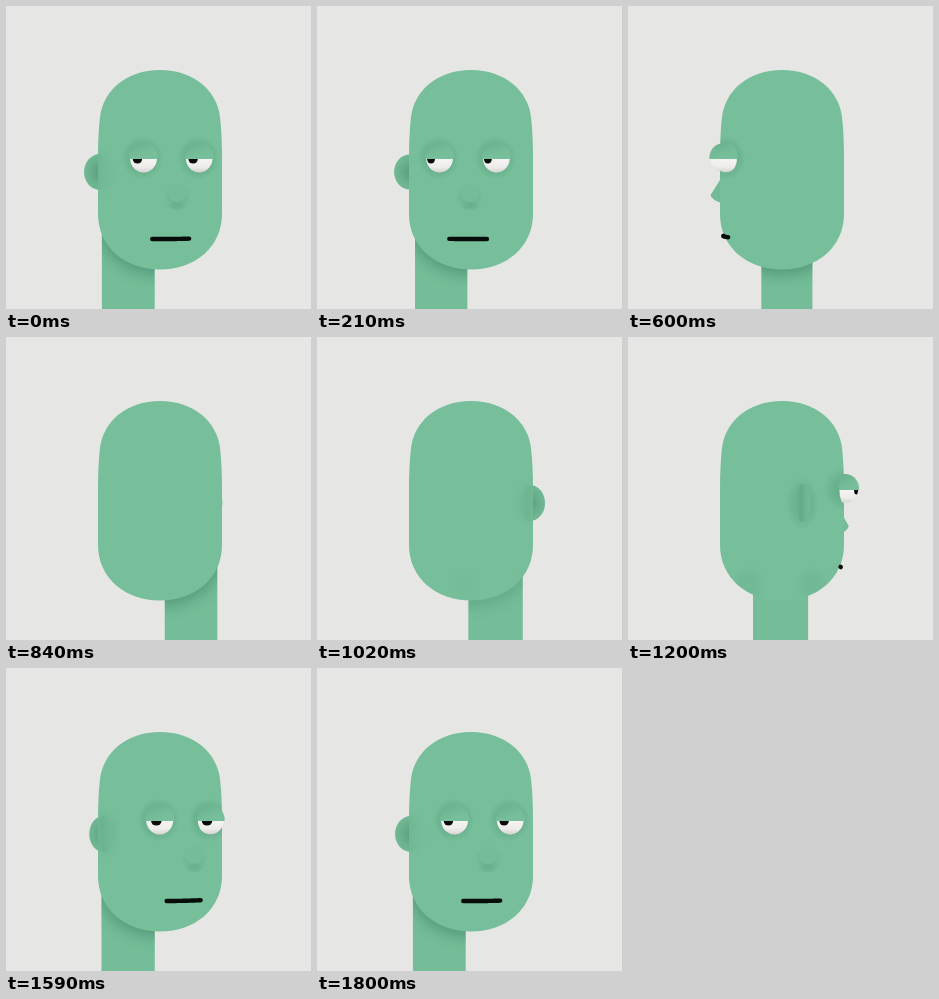
Recreate the animation shown at these times as an HTML page. Size 305 by 303 pixels, loop 1830 ms.

```html
<!DOCTYPE html>
<html lang="en">
<head>
<meta charset="utf-8">
<title>Turning head</title>
<style>
  html, body { margin: 0; width: 100%; height: 100%; overflow: hidden; background: #e6e6e4; }
  svg { display: block; width: 100vw; height: 100vh; }
</style>
</head>
<body>
<svg viewBox="0 0 305 303" preserveAspectRatio="none">
  <defs>
    <path id="skull" d="M92 152C92 138 92.500 124 94 111C97 85 120 64 154 64S211 85 214 111C215.500 124 216 138 216 152V208C216 241 189 263.500 154 263.500S92 241 92 208Z"/>
    <clipPath id="inHead"><use href="#skull"/></clipPath>
    <clipPath id="inNeck"><rect id="neckClip" y="190" height="113"/></clipPath>
    <clipPath id="inWhite0"><path id="whiteClip0"/></clipPath>
    <clipPath id="inWhite1"><path id="whiteClip1"/></clipPath>
    <radialGradient id="shade">
      <stop offset=".45" stop-color="#2f6f54" stop-opacity=".55"/>
      <stop offset="1" stop-color="#2f6f54" stop-opacity="0"/>
    </radialGradient>
    <radialGradient id="earBowl">
      <stop offset=".1" stop-color="#5f9f80"/>
      <stop offset=".7" stop-color="#6cb28f"/>
      <stop offset="1" stop-color="#70b893"/>
    </radialGradient>
    <linearGradient id="earFill">
      <stop offset="0" stop-color="#70b793"/>
      <stop offset=".4" stop-color="#66aa88"/>
      <stop offset="1" stop-color="#76bf9a"/>
    </linearGradient>
    <linearGradient id="lidFill" x2=".6" y2="1">
      <stop offset="0" stop-color="#69b08d"/>
      <stop offset=".8" stop-color="#76bf9a"/>
    </linearGradient>
    <linearGradient id="whiteFill" x2="0" y2="1">
      <stop offset="0" stop-color="#f6f4f3"/>
      <stop offset=".6" stop-color="#eeecea"/>
      <stop offset="1" stop-color="#d3d3cf"/>
    </linearGradient>
    <filter id="soft" x="-30%" y="-30%" width="160%" height="160%"><feGaussianBlur stdDeviation="8"/></filter>
  </defs>
  <rect width="305" height="303" fill="#e6e6e4"/>
  <rect id="neck" y="190" height="113" fill="#74bd98"/>
  <g clip-path="url(#inNeck)">
    <use id="chinShadow" href="#skull" y="4" fill="#2f6f54" filter="url(#soft)"/>
  </g>
  <ellipse id="earBack" fill="url(#earBowl)"/>
  <path id="nose" fill="#72bb96"/>
  <use href="#skull" fill="#76bf9a"/>
  <g clip-path="url(#inHead)" fill="url(#shade)">
    <ellipse id="neckShadeL" cy="247" rx="18" ry="20"/>
    <ellipse id="neckShadeR" cy="247" rx="18" ry="20"/>
    <ellipse id="earShade"/>
    <ellipse id="eyeShade0"/>
    <ellipse id="eyeShade1"/>
    <g id="noseFront">
      <ellipse id="noseShade" cy="191" ry="14" opacity=".2"/>
      <ellipse id="noseTip" cy="188" ry="8" fill="#76bf9a" opacity=".75"/>
      <ellipse id="noseBase" cy="200" ry="5" opacity=".2"/>
    </g>
    <ellipse id="earFront" fill="url(#earFill)"/>
  </g>
  <polyline id="mouth" fill="none" stroke="#080c0a" stroke-width="4.400" stroke-linecap="round" stroke-linejoin="round"/>
  <g id="eyes">
    <g id="eye0">
      <path id="white0" fill="url(#whiteFill)"/>
      <ellipse id="pupil0" fill="#080c0a" clip-path="url(#inWhite0)"/>
      <path id="lid0" fill="url(#lidFill)"/>
    </g>
    <g id="eye1">
      <path id="white1" fill="url(#whiteFill)"/>
      <ellipse id="pupil1" fill="#080c0a" clip-path="url(#inWhite1)"/>
      <path id="lid1" fill="url(#lidFill)"/>
    </g>
  </g>
</svg>
<script>
const LOOP = 1830, STEP = 30, TURN = 1800;
const CX = 154, EYE_Y = 152, HEAD_R = 62;
const rad = deg => deg * Math.PI / 180;
const sin = deg => Math.sin(rad(deg)), cos = deg => Math.cos(rad(deg));
const perspective = z => 740 / (800 - z);
const $ = id => document.getElementById(id);

function set(id, attrs) {
  for (const key in attrs) $(id).setAttribute(key, attrs[key]);
}

// A point at an angle around the vertical axis, with x relative to the centre.
function orbit(angle, radius) {
  const z = radius * cos(angle), scale = perspective(z);
  return { x: radius * sin(angle) * scale, z, scale };
}

// Outline of the part of a slightly tall ball that stands out of the round head.
function ballPath(ball, r, from, to) {
  const left = [], right = [];
  for (let i = 0; i <= 20; i++) {
    const lat = from + (to - from) * i / 20;
    const ring = r * cos(lat), y = EYE_Y + 1.08 * r * sin(lat);
    let min = Infinity, max = -Infinity;
    for (let a = 0; a <= 180; a += 2) {
      const x = ball.x + ring * cos(a), z = ball.z + ring * sin(a);
      const outside = x * x + z * z > HEAD_R * HEAD_R;
      if (outside && (z > 0 || Math.abs(x) > HEAD_R)) {
        min = Math.min(min, x);
        max = Math.max(max, x);
      }
    }
    if (min <= max) {
      left.push(`${(CX + min).toFixed(2)} ${y.toFixed(2)}`);
      right.unshift(`${(CX + max).toFixed(2)} ${y.toFixed(2)}`);
    }
  }
  return left.length ? `M${left.concat(right).join("L")}Z` : "";
}

function drawNeck(turn) {
  const p = turn - 16.5, depth = 32 * sin(p);
  const scale = 830 / (830 - depth);
  const x = CX - 32 * cos(p) * scale, w = 53 * scale;
  set("neck", { x: x - w / 2, width: w });
  set("neckClip", { x: x - w / 2, width: w });
  const near = Math.max(0, sin(p));
  set("chinShadow", { opacity: 0.52 * (1 - near ** 2) });
  set("neckShadeL", { cx: x - w / 2 - 4, opacity: 0.12 * near ** 3 });
  set("neckShadeR", { cx: x + w / 2 + 4, opacity: 0.12 * near ** 3 });
}

function drawEar(turn) {
  const a = turn - 86, ear = orbit(a, 66);
  const facing = Math.max(0, cos(a));
  const width = length => Math.hypot(length * sin(a), 7.5 * cos(a)) * ear.scale;
  const place = { cx: CX + ear.x, cy: 166, ry: 19 * ear.scale };
  set("earBack", { ...place, rx: width(17) });
  set("earFront", { ...place, rx: width(9), opacity: facing });
  set("earShade", { ...place, rx: width(9) + 9, ry: 27, opacity: 0.3 * facing });
}

function drawNose(turn) {
  const a = turn + 2, tip = orbit(a, 77), root = orbit(a, 62);
  const x = CX + tip.x, b = CX + root.x;
  set("nose", { d: `M${b} 166Q${(x + b) / 2} 178 ${x} 189Q${x} 194 ${b} 198Z` });
  const face = Math.max(0, cos(a));
  set("noseFront", { opacity: Math.min(1, face * 1.4) });
  set("noseShade", { cx: x, rx: 5 + 9 * face });
  set("noseTip", { cx: x, rx: 3 + 6 * face });
  set("noseBase", { cx: x, rx: 3 + 7 * face });
}

function drawMouth(turn) {
  const points = [];
  for (let a = turn - 18; a <= turn + 18; a += 1) {
    const z = 61 * cos(a), scale = perspective(z) ** 0.5;
    if (z > -3) points.push(`${CX + 61 * sin(a) * scale},${152 + 81 * scale}`);
  }
  set("mouth", { points: points.join(" ") });
}

function drawEyes(turn) {
  const gaze = turn - 40;
  const balls = [-24.5, 24.5].map(side => orbit(turn + side, 68.4));
  balls.forEach((ball, i) => {
    const size = ball.scale ** 0.5;
    const white = ballPath(ball, 13.4 * size, 4, 90);
    set("white" + i, { d: white });
    set("whiteClip" + i, { d: white });
    set("lid" + i, { d: ballPath(ball, 14.4 * size, -90, 4) });
    set("pupil" + i, {
      cx: CX + ball.x + 12.5 * sin(gaze), cy: EYE_Y + 1,
      rx: Math.max(2, 5.4 * cos(gaze)), ry: 4.6,
      opacity: cos(gaze) > -0.1 ? 1 : 0
    });
    set("eyeShade" + i, {
      cx: CX + ball.x - 1, cy: EYE_Y, rx: 21, ry: 22,
      opacity: 0.45 * Math.min(1, Math.max(0, (ball.z + 10) / 30))
    });
  });
  $("eyes").append($(balls[0].z > balls[1].z ? "eye0" : "eye1"));
}

function draw(ms) {
  const p = Math.floor(ms % LOOP / STEP) * STEP / TURN;
  const turn = 10.7 - 360 * p * p * (3 - 2 * p);
  drawNeck(turn);
  drawEar(turn);
  drawNose(turn);
  drawMouth(turn);
  drawEyes(turn);
}

const start = performance.now();
function tick() {
  draw(performance.now() - start);
  requestAnimationFrame(tick);
}
tick();
</script>
</body>
</html>
```
